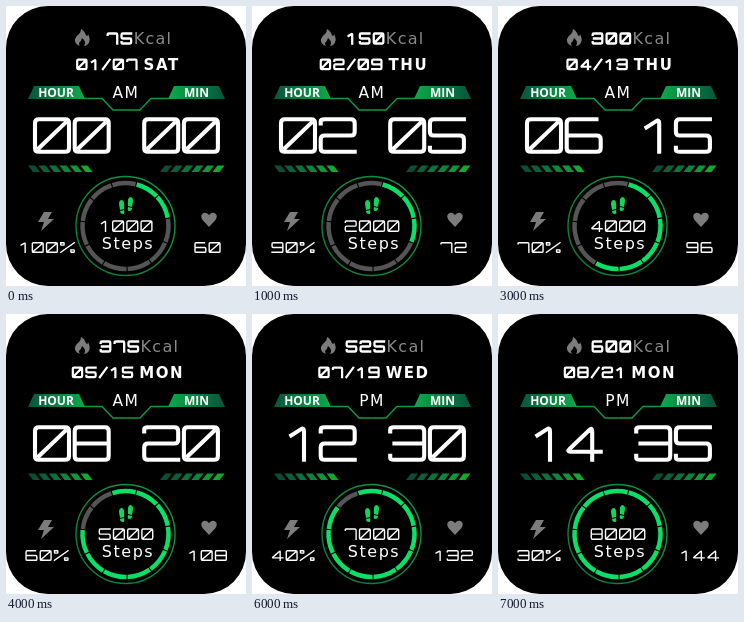
Write an HTML page that moves like this. It is 240 px wide and 280 px high and loops after 8000 ms.

```html
<!DOCTYPE html>
<html lang="en">
<head>
<meta charset="utf-8">
<title>Watch face</title>
<style>
  html, body { margin: 0; width: 100%; height: 100%; overflow: hidden; background: #fff; }
  svg { display: block; width: 240px; height: 280px; }
  text { font-family: "DejaVu Sans", sans-serif; fill: #fff; }
  .tab { font: bold 12px "Open Sans", sans-serif; text-anchor: middle; }
  .num { fill: none; stroke: #fff; stroke-linecap: square; stroke-linejoin: round; }
  .icon { fill: #7c7c7c; }
</style>
</head>
<body>
<svg viewBox="0 0 240 280">
  <defs>
    <linearGradient id="tabFill">
      <stop offset="0" stop-color="#06553d"/>
      <stop offset="1" stop-color="#0cab48"/>
    </linearGradient>
    <linearGradient id="rim" x1="0" y1="1" x2="1" y2="0">
      <stop offset="0" stop-color="#0b7a36"/>
      <stop offset="1" stop-color="#0f9a44"/>
    </linearGradient>
  </defs>
  <rect width="240" height="280" rx="42"/>

  <path class="icon" d="M75 23C80 26 79 29 81 30Q82 30 82 28Q86 35 81 39Q79 40 78 40Q81 36 76 32Q75 36 73 37Q73 39 74 40Q68 38 69 33Q70 30 73 28Q75 26 75 23Z"/>
  <path class="icon" d="M38 206H46L42 213H48L35 225L38 216H32Z"/>
  <path class="icon" d="M203 221L196.500 214Q193.500 209 197.500 207Q200.500 206 203 209Q205.500 206 208.500 207Q212.500 209 209.500 214Z"/>

  <g id="wing">
    <path d="M28 80H73L79 93H22Z" fill="url(#tabFill)"/>
    <path d="M78 92.500H96L107 104H120.500" fill="none" stroke="#0c9a43" stroke-width="1.400"/>
  </g>
  <use href="#wing" transform="translate(241 0) scale(-1 1)"/>
  <text class="tab" x="50" y="91">HOUR</text>
  <text class="tab" x="190.500" y="91">MIN</text>
  <text id="half" x="120" y="92" font-size="15.500" letter-spacing="1.500" text-anchor="middle"></text>

  <circle cx="119.500" cy="220" r="49.500" fill="none" stroke="url(#rim)" stroke-width="1.400"/>
  <g id="ring" fill="none" stroke-width="4.500"></g>
  <g fill="#10d65c" transform="translate(240 0) scale(-1 1)">
    <path d="M113 195Q113 191 116 191Q119 192 118 200L114 201ZM114 202L118 201Q119 205 117 205Q114 205 114 202Z"/>
    <path d="M127 198Q127 194 124 194Q121 195 122 203L126 204ZM126 205L122 204Q121 208 123 208Q126 208 126 205Z"/>
  </g>
  <text x="122" y="243" font-size="16" letter-spacing="1.500" text-anchor="middle">Steps</text>
</svg>

<script>
const svg = document.querySelector('svg');
const ring = document.getElementById('ring');
const half = document.getElementById('half');

// Numeral strokes: xy pairs on an 8 by 8 grid.
const strokes = {
  0: '40 80 88 08 00 40,17 71',
  1: '12 40 48',
  2: '01 00 80 84 04 08 88',
  3: '01 00 80 88 08 07,14 84',
  4: '68 60 06 86',
  5: '80 00 04 84 88 08 07',
  6: '70 00 08 88 84 04',
  7: '01 00 80 88',
  8: '40 80 88 08 00 40,04 84',
  9: '84 04 00 80 88 08',
  '/': '08 60',
  '%': '08 80,00 20 22 02 00,66 86 88 68 66'
};

function add(parent, tag, attrs) {
  const el = document.createElementNS('http://www.w3.org/2000/svg', tag);
  for (const key in attrs) el.setAttribute(key, attrs[key]);
  return parent.appendChild(el);
}

// One polyline with softened corners.
function soften(pts, r) {
  let d = 'M' + pts[0];
  for (let i = 1; i < pts.length - 1; i++) {
    const p = pts[i];
    const toward = q => {
      const len = Math.hypot(q[0] - p[0], q[1] - p[1]);
      const k = Math.min(r / len, 0.5);
      return [p[0] + (q[0] - p[0]) * k, p[1] + (q[1] - p[1]) * k];
    };
    d += `L${toward(pts[i - 1])}Q${p} ${toward(pts[i + 1])}`;
  }
  return d + 'L' + pts[pts.length - 1];
}

function glyph(ch, x, y, w, h) {
  return strokes[ch].split(',').map(line => soften(
    line.split(' ').map(p => [x + p[0] * w / 8, y + p[1] * h / 8]),
    ch === '%' ? 0.5 : h * 0.12)).join('');
}

const widths = { 1: 0.85, '/': 0.72, '%': 1.25 };
const advance = (ch, w, gap) => w * (widths[ch] || 1) + gap;

function numeral(str, x, y, w, h, gap) {
  let d = '';
  for (const ch of str) {
    d += glyph(ch, x, y, ch === '%' ? w * widths[ch] : w, h);
    x += advance(ch, w, gap);
  }
  return d;
}

// A centred row: numerals, then an optional word.
function row(cx, y, w, h, weight, word) {
  const gap = weight + 2;
  const path = add(svg, 'path', { class: 'num', 'stroke-width': weight });
  const label = word && add(svg, 'text', { y: y + h + 0.8, ...word.style });
  return (str, text) => {
    const numW = [...str].reduce((sum, ch) => sum + advance(ch, w, gap), 0) - gap;
    let total = numW;
    if (label) {
      label.textContent = text;
      total += word.space + label.getComputedTextLength();
    }
    const x = cx - total / 2;
    path.setAttribute('d', numeral(str, x, y, w, h, gap));
    if (label) label.setAttribute('x', x + numW + word.space);
  };
}

const energy = row(134, 27.5, 9.6, 10, 2.3,
  { space: 2.5, style: { 'font-size': 16, 'letter-spacing': 1.3, style: 'fill:#8a8a8a' } });
const date = row(122.5, 53.7, 9.3, 9.4, 2.2,
  { space: 7, style: { 'font-size': 15, 'font-weight': 'bold', 'letter-spacing': 1.6 } });
const steps = row(120, 215, 10.8, 10.3, 1.4);
const battery = row(41, 236.7, 10.8, 9.6, 1.4);
const pulse = row(201.5, 236.7, 10.8, 9.6, 1.4);
const big = add(svg, 'path', { class: 'num', 'stroke-width': 4.1 });

const two = n => String(n).padStart(2, '0');
const bigPair = (n, x) => [...two(n)].map((ch, i) =>
  glyph(ch, x + i * 39.7 + (ch === '1' ? 6 : 0), 113.3, 34, 32.5)).join('');

// Slanted stripes under the hour and minute, leaning towards the middle.
function stripes(x0, lean) {
  for (let i = 0; i < 6; i++) {
    const x = x0 + i * 10.5;
    add(svg, 'path', {
      d: `M${x + 2.5 - lean} 159.500h7L${x + 9.5 + lean} 166h-7Z`,
      fill: `hsl(${160 - i * 6} 80% ${17 + i * 4}%)`
    });
  }
}
stripes(22, 2.5);
stripes(154, -2.5);

const polar = (deg, r) => {
  const a = deg * Math.PI / 180;
  return [119.5 + r * Math.sin(a), 220 - r * Math.cos(a)];
};
const span = 360 / 11;
const segments = Array.from({ length: 11 }, (_, i) => add(ring, 'path', {
  d: `M${polar(15 + i * span, 43)}A43 43 0 0 1 ${polar(13.5 + (i + 1) * span, 43)}`
}));

const days = ['SAT', 'THU', 'SAT', 'THU', 'MON', 'SAT', 'WED', 'MON'];
const lit = [2, 3, 4, 6, 8, 8, 9, 10];

function show(n) {
  const k = n + 1;
  energy(String(75 * k), 'Kcal');
  date(`${two(k)}/${two(7 + 2 * n)}`, days[n]);
  half.textContent = n < 6 ? 'AM' : 'PM';
  big.setAttribute('d', bigPair(2 * n, 29) + bigPair(5 * n, 138.2));
  steps(String(1000 * k));
  battery(100 - 10 * n + '%');
  pulse(String(60 + 12 * n));
  // The top segment joins in the second half.
  segments.forEach((s, i) => {
    const on = i < lit[n] || (i === 10 && n > 3);
    s.setAttribute('stroke', on ? '#0be066' : '#555');
  });
}

let current = -1;
function tick() {
  const n = Math.floor(performance.now() % 8000 / 1000);
  if (n !== current) show(current = n);
  requestAnimationFrame(tick);
}
tick();
</script>
</body>
</html>
```
